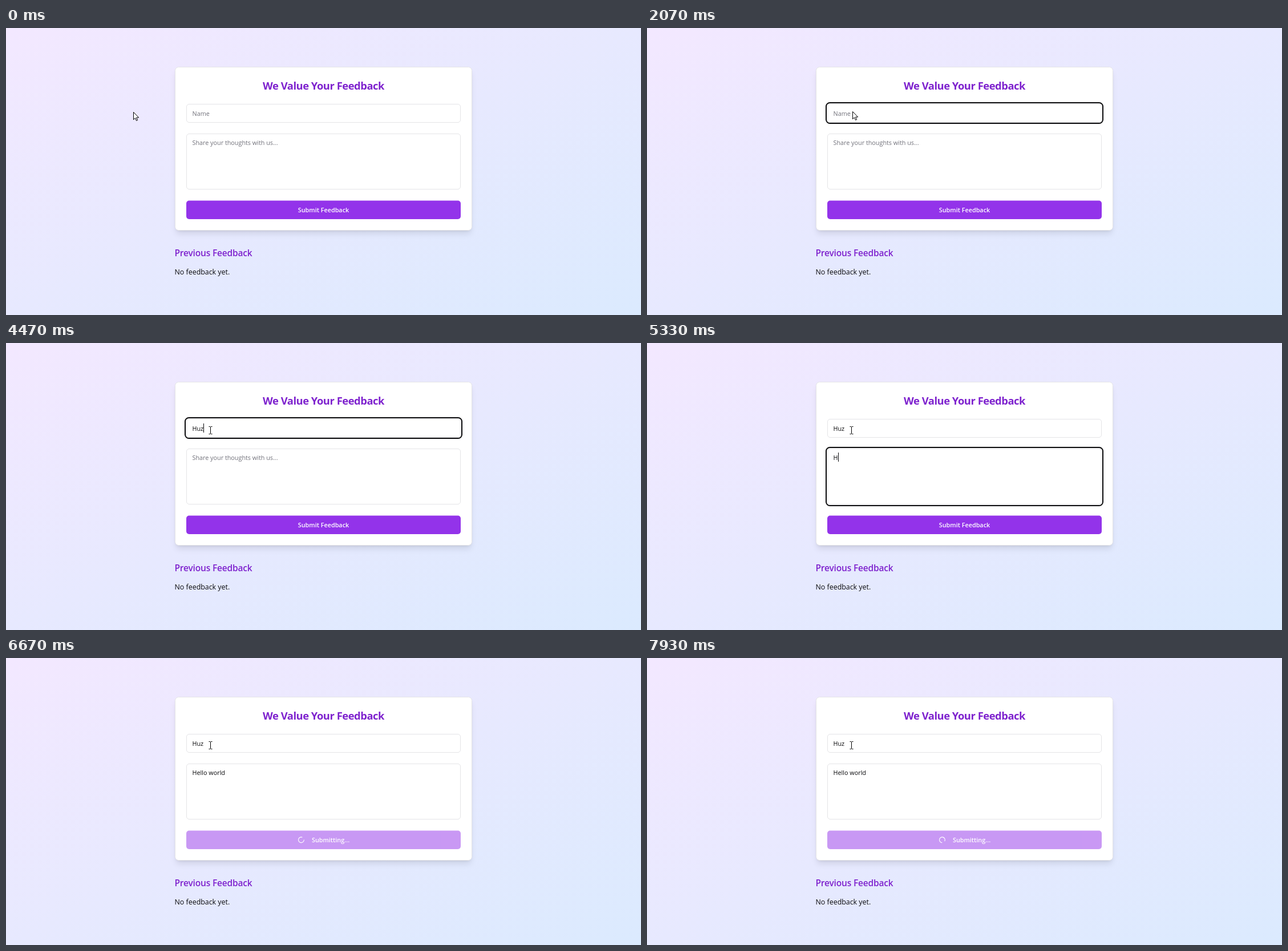
Animation of 1113 by 503 pixels, one loop 8000 ms. Source, as an HTML page:

```html
<!DOCTYPE html>
<html lang="en">
<head>
<meta charset="utf-8">
<title>Feedback form</title>
<style>
  html, body { margin: 0; width: 100%; height: 100%; overflow: hidden; }
  body { position: relative; background: linear-gradient(to bottom right, #f3e8ff, #dbeafe); }
  .card {
    position: absolute; left: 296px; top: 68px; width: 521px; height: 287px;
    box-sizing: border-box; background: #fff;
    border: 1px solid #e4e4e7; border-radius: 6.5px;
    box-shadow: 0 8px 12px -2.4px rgba(0,0,0,.1), 0 3px 5px -3.2px rgba(0,0,0,.1);
  }
  svg { position: absolute; left: 0; top: 0; display: block; }
  text { font: 400 10.8px "Open Sans", "Noto Sans", sans-serif; fill: #09090b; }
  .title { font-size: 18.4px; font-weight: 700; letter-spacing: -.47px; fill: #7e22ce; }
  .subtitle { font-size: 15.5px; font-weight: 600; letter-spacing: -.18px; fill: #7e22ce; }
  .note { font-size: 12.4px; }
  .label { font-weight: 600; fill: #fff; }
  .hint { fill: #71717a; }
  .field { fill: #fff; stroke: #e4e4e7; }
  .ring { fill: none; stroke: #09090b; stroke-width: 2; }
  .caret { fill: #09090b; }
  .button { fill: #9333ea; }
</style>
</head>
<body>
<div class="card"></div>
<svg width="1113" height="503" viewBox="0 0 1113 503">
  <text class="title" x="556.5" y="108" text-anchor="middle">We Value Your Feedback</text>

  <rect class="field" x="316.5" y="133.5" width="480" height="32" rx="4.5"/>
  <rect class="ring" id="nameRing" x="314" y="131" width="485" height="36" rx="6.5"/>
  <text id="name" x="326.5" y="154" xml:space="preserve"></text>

  <rect class="field" x="316.5" y="185.5" width="480" height="97" rx="4.5"/>
  <rect class="ring" id="noteRing" x="314" y="183" width="485" height="102" rx="6.5"/>
  <text id="note" x="326.5" y="205" xml:space="preserve"></text>

  <rect class="caret" id="caret" width="1" height="16"/>

  <g id="idle">
    <rect class="button" x="316" y="302.5" width="481" height="32.5" rx="4.9"/>
    <text class="label" x="556.5" y="323" text-anchor="middle">Submit Feedback</text>
  </g>
  <g id="busy" opacity=".5">
    <rect class="button" x="316" y="302.5" width="481" height="32.5" rx="4.9"/>
    <g transform="translate(517.4 318.75) scale(.5417)">
      <path id="spinner" d="M9 0A9 9 0 1 1 2.78 -8.56" fill="none" stroke="#fff" stroke-width="2" stroke-linecap="round"/>
    </g>
    <text class="label" x="536" y="323">Submitting...</text>
  </g>

  <text class="subtitle" x="295.5" y="400">Previous Feedback</text>
  <text class="note" x="295.5" y="432">No feedback yet.</text>

  <path id="arrow" d="M.5 .5V13.6L3.5 10.8 5.5 15.4 7.6 14.5 5.6 10H9.7Z" fill="#fff" stroke="#000" stroke-linejoin="round"/>
  <path id="beam" d="M-3 -6.5H-1L0 -5.8 1 -6.5H3M0 -6V6M-3 6.5H-1L0 5.8 1 6.5H3" fill="none" stroke="#000"/>
</svg>
<script>
const LOOP = 8000, SUBMIT = 6670, TICK = 1000 / 15;
const NAME = "Huz", NOTE = "Hello world";
const $ = id => document.getElementById(id);

// [start, shape, x, y]
const pointer = [
  [0, "arrow", 223, 147],
  [70, "arrow", 250, 147],
  [135, "arrow", 300, 146],
  [200, "beam", 345.5, 147],
  [270, "beam", 361.5, 147],
  [2000, "arrow", 360, 146],
  [2870, "beam", 361.5, 147],
  [3330, "beam", 360.5, 150],
  [3400, "beam", 358.5, 153]
];
const focus = [[0, ""], [470, "name"], [2800, ""], [3730, "name"], [4670, "note"], [SUBMIT, ""]];
const blink = [[0, true], [1000, false], [1530, true], [2070, false], [3730, true], [5200, false], [5330, true]];
const nameKeys = [4130, 4330, 4470];
const noteKeys = [5330, 5470, 5530, 5670, 5800, 5930, 6070, 6200, 6270, 6330, 6400];

const latest = (steps, t) => steps.filter(s => s[0] <= t).pop();
const show = (id, on) => { $(id).style.display = on ? "" : "none"; };

function type(id, full, keys, hint, t) {
  const count = keys.filter(k => k <= t).length;
  const el = $(id);
  const value = count ? full.slice(0, count) : hint;
  if (el.textContent !== value) el.textContent = value;
  el.setAttribute("class", count ? "" : "hint");
  return count ? el.getComputedTextLength() : 0;
}

function draw(t) {
  const width = {
    name: type("name", NAME, nameKeys, "Name", t),
    note: type("note", NOTE, noteKeys, "Share your thoughts with us...", t)
  };

  const active = latest(focus, t)[1];
  show("nameRing", active === "name");
  show("noteRing", active === "note");
  show("caret", active && latest(blink, t)[1]);
  if (active) {
    $("caret").setAttribute("x", Math.round(326.6 + width[active]));
    $("caret").setAttribute("y", active === "name" ? 141 : 192);
  }

  const busy = t >= SUBMIT;
  show("idle", !busy);
  show("busy", busy);
  const turn = Math.round((t - SUBMIT) / TICK) * 24;
  $("spinner").setAttribute("transform", `rotate(${turn})`);

  const [, shape, x, y] = latest(pointer, t);
  show("arrow", shape === "arrow");
  show("beam", shape === "beam");
  $(shape).setAttribute("transform", `translate(${x} ${y})`);
}

const start = performance.now();
function frame() {
  draw((performance.now() - start) % LOOP);
  requestAnimationFrame(frame);
}
frame();
</script>
</body>
</html>
```
